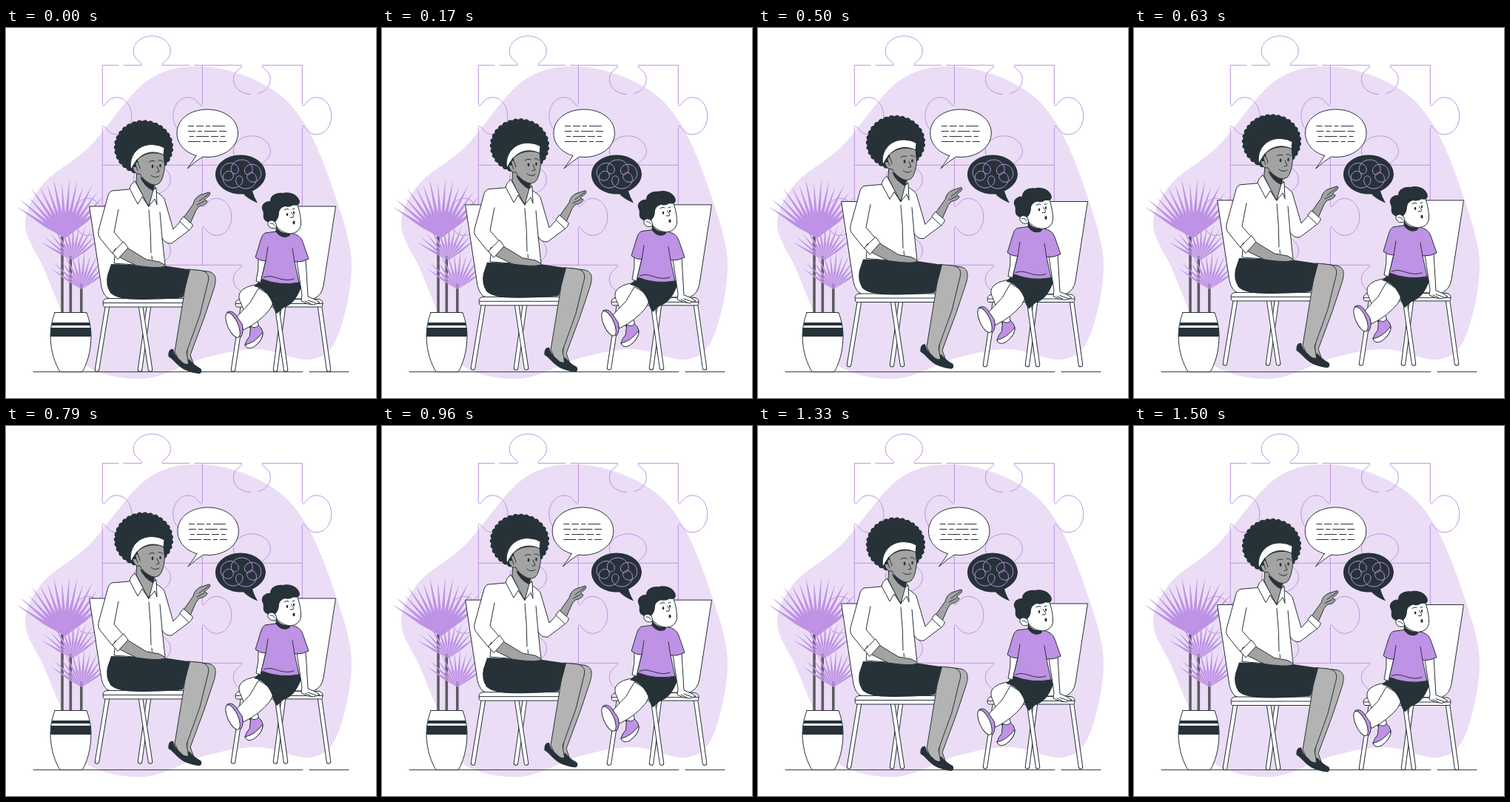
Animation of 500x500 px, one loop 1540 ms. Source, as an HTML page:

```html
<!DOCTYPE html>
<html lang="en">
<head>
<meta charset="utf-8">
<title>Conversation</title>
<style>
html, body { margin: 0; width: 100%; height: 100%; overflow: hidden; background: #fff; }
svg { display: block; width: 100vw; height: 100vh; }
.ln { fill: none; stroke: #263238; stroke-width: 1; stroke-linecap: round; stroke-linejoin: round; }
.w { fill: #fff; }
.d { fill: #263238; }
.p { fill: #be92e4; }
.g { fill: #a3a3a3; }
.lg { fill: #b3b3b3; }
.purple { fill: none; stroke: #be92e4; stroke-width: 1; }
</style>
</head>
<body>
<svg viewBox="0 0 500 500">
  <path id="blob" fill="#ebddf6"/>
  <g class="purple" transform="translate(.3 .3)">
    <path d="M152 50H130V103M130 134V240M130 270V320M158 50H183M211 50H248M254 50H318M346 50H400V103M400 134V320M265 50V103M265 134V240M265 270V320M130 185H183M211 185H318M346 185H400M211 320H318"/>
    <g id="tabs"></g>
  </g>
  <path class="ln" d="M37 464.700H401M410 464.700H463"/>

  <g id="plant">
    <path d="M76 272V386M87.300 308V386M101.800 345V386" fill="none" stroke="#5c5c60" stroke-width="3.600"/>
    <path id="leaves" class="p"/>
    <path class="ln w" d="M66 384.500H109Q115 401 115 415C115 438 109 455 103 464.700H73C67 455 60 438 60 415Q60 401 66 384.500Z"/>
    <path class="d" d="M62.500 398H112.800L113.700 402H61.500ZM61 405H114.500L115 417H60Z"/>
  </g>

  <g id="people">
    <!-- chairs -->
    <g class="ln w">
      <path d="M113 241H205V366H140Q132 363 129 350Z"/>
      <path d="M385 241H445.500L429 348Q427 361 416 366H350Z"/>
      <g id="legs"></g>
      <path d="M137 365.500H250V377H133Q131 377 131 371Q131 366 137 365.500ZM131.500 371.500H250"/>
      <path d="M316 366.500H423Q428 368 428 372Q428 377 426 377H312Q310 377 310 372Q311 367 316 366.500ZM310.500 372.500H428"/>
    </g>

    <!-- woman: legs and skirt -->
    <path class="ln lg" d="M255 327L273 329C284 331 285 339 281 352L268 391L249 442L254 456L244 454Z"/>
    <path class="d" d="M247 447Q256 457 263 460Q266 464 262 467Q250 465 243 457Z"/>
    <path class="ln lg" d="M246 326L262 327.500C273 329 276 335 272 347L262 388L244 438L247 456L236 454L228 437L240 364Z"/>
    <path class="d" d="M226 434C221 433 219 438 219.500 444C228 449 233 459 244 463Q255 467 261 467Q265 466 263 462Q253 459 247 453Q242 456 236 449Q228 443 226 434Z"/>
    <path class="d" d="M142 319L212 321L249 326.500L239 364Q218 367 180 367Q150 367 141 358Q134 347 137 334Z"/>

    <!-- woman: hair, neck, blouse -->
    <path id="hair" class="d"/>
    <path class="ln g" d="M177 190L176 209L192 241L203 220L199 208Z"/>
    <path class="d" d="M181 201Q186 214 200 221L200 211Z"/>
    <path class="ln g" d="M241 255L253 238Q255 229 262 226L274 222Q277 222 275 226L268 232L272 234Q271 239 261 241L257 246L249 264Z"/>
    <path class="ln" d="M261 234L274 224M258 239L268 234"/>
    <path class="ln w" d="M174 213L166 218L143 220Q139 222 138 226L126 270Q123 279 127 284L144 305L148 298L146 318Q180 322 215 320L211 284Q215 292 224 291L248 273L238 259L226 272L214 231Q212 227 202 221L193 241Z"/>
    <path class="ln" d="M152 245L146 276L159 291M208 249L211 284M193 246Q196 275 196 304M197 308L197.500 313"/>
    <path class="ln w" d="M174 207Q168 211 167 217L178 238L184 228L193 241L201 231L204 239L203 216L199 219L193 241Z"/>
    <path class="ln w" d="M240 255L252.500 266Q251 271 247.500 273.500L235 261.500Z"/>
    <path class="ln g" d="M162 296L190 313L207 316Q214 319 216 322L208 323.500Q196 324 176 321L152 309Z"/>
    <path class="ln w" d="M159 289L165 297L151 312.500L144 304Z"/>

    <!-- woman: face -->
    <path class="ln g" d="M171 188C177 172 195 165 213 171L214.500 186Q213 204 207 210Q201 214 194 210Q185 205 181 197Q174 199 171 188Z"/>
    <path class="ln w" d="M168.500 190C166 173 178 157 198 157.500Q208 158 214 162L213 171.500C198 164 180 168 171 188Z"/>
    <path class="d" d="M170 188L177 177Q180 182 177 188Z"/>
    <path class="ln g" d="M178 193Q173 181 176 181Q179 181 181 190"/>
    <ellipse class="d" cx="198" cy="187" rx="1.400" ry="2.400"/>
    <ellipse class="d" cx="208.500" cy="186" rx="1.300" ry="2.300"/>
    <path class="ln" d="M193 181Q197 178 201 180M206 179Q210 178 212 181M204 187L207 194L203 195M196 199Q201 204 207 200"/>

    <!-- boy: legs -->
    <path class="ln w" d="M345 346Q321 348 316 358Q313 364 318 373L330 406L342 405L334 370L352 360Z"/>
    <path class="ln p" d="M331 403Q337 407 341 402Q347 406 347 414Q345 425 334 431Q325 434 323 428Q325 421 329 417Z"/>
    <path class="ln w" d="M323 428Q336 426 347 411Q348 421 335 431Q325 436 323 428Z"/>
    <path class="ln w" d="M341 352L330 371L312 390L321 408Q343 397 356 381L364 366Z"/>
    <path class="ln p" d="M299 384Q305 381 310 387L319 400Q322 411 317 418Q309 414 305 404Z"/>
    <ellipse class="ln w" cx="306.500" cy="401.500" rx="7" ry="18" transform="rotate(-24 306.500 401.500)"/>
    <path class="d" d="M346 339L335 349Q351 352 359 370Q361 380 366 386L375 378Q391 373 399 350L396 342Z"/>

    <!-- boy: arms and shirt -->
    <path class="ln w" d="M341 312Q342 326 338 342L344 344L351 314Z"/>
    <path class="ln w" d="M393 315L400 361L399 369Q407 374 416 374L424 371Q418 366 408 363L405 312Z"/>
    <path class="ln" d="M408 368L419 372M404 369L412 373"/>
    <path class="ln p" d="M365 275L350 277Q346 279 344 287L337 310Q343 315 351 315L345 339Q370 349 396 344L390 316Q400 317 409 312L401 289Q398 279 384 277Q374 288 365 275Z"/>
    <path class="ln" d="M354 296L351 315M387 298L390 316M364 337Q379 343 389 339M348 337Q357 334 363 337"/>

    <!-- boy: head -->
    <path class="ln w" d="M366 262L365 275Q373 287 384 279L384 268Z"/>
    <path class="d" d="M365 268Q371 279 384 277L383 281Q375 286 365 276Z"/>
    <path class="ln w" d="M363 247Q376 237 394 239Q399 254 398.500 266Q397 277 384 278Q371 277 364 266Z"/>
    <path class="d" d="M350 260C346 256 349 252 347 247C343 240 350 233 357 234C357 226 365 222 374 223C384 220 396 226 397 235Q396 241 389 239Q383 243 377 241Q370 243 369 249Q369 257 364 262Q355 265 350 260Z"/>
    <path class="ln w" d="M365 265Q363 260 358 260Q353 261 354 266Q357 273 365 270Z"/>
    <path class="ln" d="M357 264Q361 263 363 267M376 246Q379 243 382 245M387 245L390 244M385 249Q390 253 388 256L384 256"/>
    <ellipse class="d" cx="380" cy="252" rx="1.300" ry="2.100"/>
    <ellipse class="d" cx="389" cy="249.500" rx="1.100" ry="1.900"/>
    <ellipse class="d" cx="389" cy="263" rx="1.600" ry="2.400"/>
  </g>

  <g id="speech">
    <path class="ln w" d="M257 172.500C241 168 231 156 231 142C231 123 249 110 272 110S313.500 123 313.500 142S295 174.500 272 174.500L266 174Q256 180 245 190Q252 181 257 172.500Z"/>
    <g id="lines"></g>
  </g>

  <path class="d" d="M321 224.500C300 226 283 213 283 198C283 183 298 171.500 317 171.500S351 183 351 198Q350 212 333 220.500Q335 228 340 236.500Q327 231 321 224.500Z"/>
  <path id="scribble" class="purple"/>
</svg>
<script>
const $ = id => document.getElementById(id);
const LOOP = 1540, FPS = 24, FRAMES = 37, LEAD = 65;
const TAU = Math.PI * 2;

// closed Catmull-Rom curve through key points
function smooth(pts) {
  const n = pts.length, at = i => pts[(i + n) % n];
  let d = 'M' + at(0);
  for (let i = 0; i < n; i++) {
    const [a, b, c, e] = [at(i - 1), at(i), at(i + 1), at(i + 2)];
    const p = b.map((v, j) => v + (c[j] - a[j]) / 6);
    const q = c.map((v, j) => v - (e[j] - b[j]) / 6);
    d += `C${p} ${q} ${c}`;
  }
  return d + 'Z';
}

// spiky leaves spread between two angles in degrees
function fan(x, y, len, from, to, n) {
  let d = '';
  for (let i = 0; i < n; i++) {
    const a = (from + (to - from) * i / (n - 1)) * TAU / 360;
    const r = len * (.96 + .05 * Math.sin(i * 2.4));
    const at = (k, side) => {
      const w = len * .028 * side;
      return `${x + r * k * Math.cos(a) - w * Math.sin(a)} ${y + r * k * Math.sin(a) + w * Math.cos(a)}`;
    };
    d += `M${x} ${y}L${at(.42, 1)}L${at(1, 0)}L${at(.42, -1)}Z`;
  }
  return d;
}

// round mass with a scalloped edge
function curls(cx, cy, rx, ry, n) {
  const at = (i, k) => {
    const a = i / n * TAU;
    return `${cx + rx * k * Math.cos(a)} ${cy + ry * k * Math.sin(a)}`;
  };
  let d = 'M' + at(0, .96);
  for (let i = 0; i < n; i++) d += `Q${at(i + .5, 1.06)} ${at(i + 1, .96)}`;
  return d + 'Z';
}

function scribble(cx, cy) {
  let d = '';
  for (let i = 0; i <= 240; i++) {
    const t = i / 240 * TAU;
    const x = cx + 19 * Math.cos(t) + 9 * Math.cos(6 * t + 1);
    const y = cy + 11 * Math.sin(t) + 9 * Math.sin(6 * t + 1);
    d += `${i ? 'L' : 'M'}${x.toFixed(2)} ${y.toFixed(2)}`;
  }
  return d;
}

const TAB = 'M-14 0C-12-5-25-6-25-19C-25-32-12-39.500 0-39.500S25-32 25-19C25-6 12-5 14 0';
const tab = (x, y, turn, dash = 'none') =>
  `<path d="${TAB}" pathLength="100" stroke-dasharray="${dash}" transform="translate(${x} ${y}) rotate(${turn})"/>`;

const leg = (top, foot) => {
  const d = `M${top} 376L${foot} 461.500`;
  return `<path d="${d}" stroke-width="6.500"/><path d="${d}" stroke="#fff" stroke-width="4.500"/>`;
};

const textLine = i =>
  `<path class="ln" stroke-dasharray="17 3 10 3 6 3" stroke-dashoffset="${i * 11 + 9}" style="stroke-linecap:butt" d="M246 ${132.5 + i * 7}H298"/>`;

$('blob').setAttribute('d', smooth([
  [266, 52], [350, 77], [404, 130], [446, 230], [467, 322], [447, 419],
  [410, 448], [340, 434], [268, 446], [187, 474], [108, 456], [82, 400],
  [52, 327], [26, 266], [50, 211], [113, 160], [190, 72]
]));
$('tabs').innerHTML =
  tab(197, 50, 0) + tab(332, 50, 180, '43 8 100') + tab(332, 185, 0) + tab(332, 320, 180) +
  tab(197, 185, 180) + tab(197, 320, 0) + tab(130, 118.5, 90) + tab(400, 118.5, 90) +
  tab(265, 118.5, -90) + tab(265, 255, 90) + tab(130, 255, -90);
$('legs').innerHTML =
  leg(137, 123) + leg(193, 181) + leg(182, 195) +
  leg(320, 307) + leg(375, 364) + leg(366, 378) + leg(424, 436);
$('lines').innerHTML = [0, 1, 2, 3].map(textLine).join('');
$('leaves').setAttribute('d',
  fan(80, 284, 82, -147, -40, 15) + fan(90, 314, 52, -150, -38, 12) + fan(102, 353, 53, -146, -35, 12));
$('hair').setAttribute('d', curls(186, 161.3, 40, 36.8, 31));
$('scribble').setAttribute('d', scribble(317, 198));

// sideways shake, one key per tenth of the loop
const SHAKE = [0, -1, 2, -4, 4, -4, 4, -4, 2, -1, 0];

function shake(u) {
  const i = Math.floor(u * 10), f = u * 10 - i;
  return SHAKE[i] + (SHAKE[i + 1] - SHAKE[i]) * f;
}

const bob = u => -10 * (1 - Math.abs(1 - 2 * u));

const move = (id, x, y) => $(id).setAttribute('transform', `translate(${x.toFixed(3)} ${y.toFixed(3)})`);

function draw(ms) {
  const step = Math.floor((ms % LOOP + 5) * FPS / 1000) % FRAMES;
  const u = (step * 1000 / FPS + LEAD) / LOOP % 1;
  move('people', 0, bob(u) + .84);
  move('speech', shake(u) + .4, 0);
}

let start;
function tick(now) {
  start ??= now;
  draw(now - start);
  requestAnimationFrame(tick);
}
draw(0);
requestAnimationFrame(tick);
</script>
</body>
</html>
```
